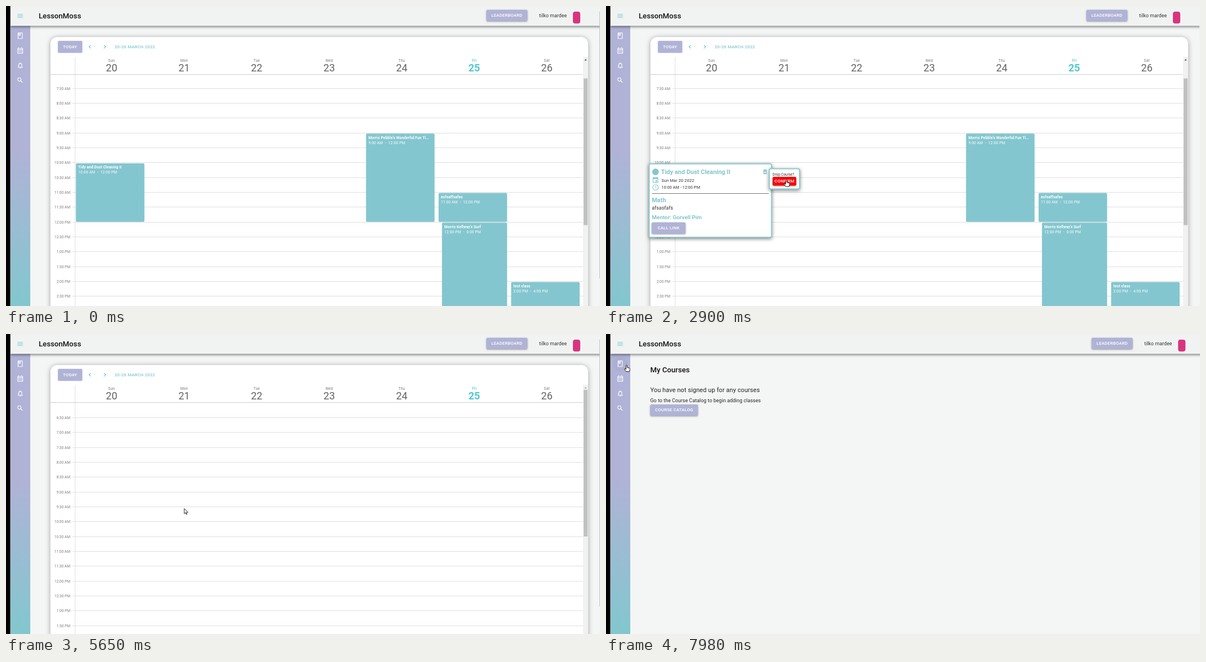
Write an HTML page with a canvas that moves like this. It is 1053 px wide and 532 px high and loops after 8 s.

```html
<!DOCTYPE html>
<html lang="en">
<head>
<meta charset="utf-8">
<title>Class calendar</title>
<style>
html, body { margin: 0; width: 100%; height: 100%; overflow: hidden; background: #f4f5f5; }
canvas { display: block; }
</style>
</head>
<body>
<canvas id="stage" width="1053" height="532"></canvas>
<script>
const c = document.getElementById('stage').getContext('2d');
const LOOP = 8000, W = 1053, H = 532;
const TEAL = '#84c6cf', LILAC = '#b0b3d6', LINE = '#e0e0e0';
const HOUR = 52.65;

const icons = {
  menu: 'M3 18h18v-2H3v2zm0-5h18v-2H3v2zm0-7v2h18V6H3z',
  book: 'M18 2H6c-1.1 0-2 .9-2 2v16c0 1.1.9 2 2 2h12c1.1 0 2-.9 2-2V4c0-1.1-.9-2-2-2zM9 4h2v5l-1-.75L9 9V4zm9 16H6V4h1v9l3-2.25L13 13V4h5v16z',
  month: 'M19 4h-1V2h-2v2H8V2H6v2H5c-1.1 0-2 .9-2 2v14c0 1.1.9 2 2 2h14c1.1 0 2-.9 2-2V6c0-1.1-.9-2-2-2zm0 16H5V10h14v10zm0-12H5V6h14v2zM9 14H7v-2h2v2zm4 0h-2v-2h2v2zm4 0h-2v-2h2v2zm-8 4H7v-2h2v2zm4 0h-2v-2h2v2zm4 0h-2v-2h2v2z',
  bell: 'M12 22c1.1 0 2-.9 2-2h-4c0 1.1.9 2 2 2zm6-6v-5c0-3.07-1.63-5.64-4.5-6.32V4c0-.83-.67-1.5-1.5-1.5s-1.5.67-1.5 1.5v.68C7.64 5.36 6 7.92 6 11v5l-2 2v1h16v-1l-2-2zm-2 1H8v-6c0-2.48 1.51-4.5 4-4.5s4 2.02 4 4.5v6z',
  search: 'M15.5 14h-.79l-.28-.27C15.41 12.59 16 11.11 16 9.5 16 5.91 13.09 3 9.5 3S3 5.91 3 9.5 5.91 16 9.5 16c1.61 0 3.09-.59 4.23-1.57l.27.28v.79l5 4.99L20.49 19l-4.99-5zm-6 0C7.01 14 5 11.99 5 9.5S7.01 5 9.5 5 14 7.01 14 9.5 11.99 14 9.5 14z',
  trash: 'M6 19c0 1.1.9 2 2 2h8c1.1 0 2-.9 2-2V7H6v12zm2.46-7.12l1.41-1.41L12 12.59l2.12-2.12 1.41 1.41L13.41 14l2.12 2.12-1.41 1.41L12 15.41l-2.12 2.12-1.41-1.41L10.59 14l-2.13-2.12zM15.5 4l-1-1h-5l-1 1H5v2h14V4z',
  event: 'M17 12h-5v5h5v-5zM16 1v2H8V1H6v2H5c-1.1 0-2 .9-2 2v14c0 1.1.9 2 2 2h14c1.1 0 2-.9 2-2V5c0-1.1-.9-2-2-2h-1V1h-2zm3 18H5V8h14v11z',
  clock: 'M12 2a10 10 0 1 0 0 20a10 10 0 1 0 0-20zM12 20a8 8 0 1 1 0-16a8 8 0 1 1 0 16zm.5-13H11v6l5.25 3.15.75-1.23-4.5-2.67z',
  prev: 'M15.41 7.41L14 6l-6 6 6 6 1.41-1.41L10.83 12z',
  next: 'M10 6L8.59 7.41 13.17 12l-4.58 4.59L10 18l6-6z'
};
for (const k in icons) icons[k] = new Path2D(icons[k]);
const arrow = new Path2D('M0 0V9.2L2.1 7.3 3.5 10.4 5 9.8 3.7 6.7H6.5Z');
const hand = new Path2D('M-1 1C-1-.2 1-.2 1 1V4.4L5 5.4Q6 5.8 6 7.3L5 11.6H-.8L-3.6 7.8Q-4 6.2-2.6 6.4L-1 7.8Z');

// day column, start hour, end hour, indent, title, start label, end label
const events = [
  [0, 10, 12, 0, 'Tidy and Dust Cleaning II', '10:00 AM', '12:00 PM'],
  [4, 9, 12, 0, "Morris Pebble's Wonderful Fun Ti…", '9:00 AM', '12:00 PM'],
  [5, 11, 12, 0, 'asfsaffsafas', '11:00 AM', '12:00 PM'],
  [5, 12, 15, 6, "Morris Kellway's Surf", '12:00 PM', '3:00 PM'],
  [6, 14, 16, 0, 'test class', '2:00 PM', '4:00 PM']
];

// pointer path: time, x, y
const path = [
  [230, 430, 545], [650, 254, 327], [960, 199, 320], [1050, 198, 320], [1260, 198.5, 326],
  [1460, 198.5, 326], [1900, 281, 291], [2450, 281, 291], [2880, 319.5, 308.5],
  [4900, 319.5, 308.5], [4910, 316, 309.5], [6080, 316, 309.5], [6230, 77, 332],
  [6520, 100, 428], [6880, 148, 380], [7250, 62, 82], [7470, 62, 82], [7640, 36.5, 55]
];

const ease = (t, from, dur) => {
  const p = Math.min(1, Math.max(0, (t - from) / dur));
  return p * p * (3 - 2 * p);
};

function pointer(t) {
  const i = path.findIndex(k => k[0] > t);
  if (i === 0) return path[0].slice(1);
  if (i < 0) return path[path.length - 1].slice(1);
  const [t0, x0, y0] = path[i - 1], [t1, x1, y1] = path[i];
  const p = ease(t, t0, t1 - t0);
  return [x0 + (x1 - x0) * p, y0 + (y1 - y0) * p];
}

function rect(x, y, w, h, color) {
  c.fillStyle = color;
  c.fillRect(x, y, w, h);
}

function box(x, y, w, h, r, color, blur = 0, drop = 0, shade = 'rgba(0,0,0,.4)') {
  c.save();
  if (blur) { c.shadowColor = shade; c.shadowBlur = blur; c.shadowOffsetY = drop; }
  c.fillStyle = color;
  c.beginPath();
  c.roundRect(x, y, w, h, r);
  c.fill();
  c.restore();
}

// y is the middle of the capital letters
function text(s, x, y, size, color, weight = 400, align = 'left', space = 0, family = 'Roboto') {
  c.font = `${weight} ${size}px ${family}, sans-serif`;
  c.letterSpacing = space * size + 'px';
  c.textAlign = align;
  c.fillStyle = color;
  c.fillText(s, x, y + size * .355);
}

function icon(name, x, y, size, color) {
  c.save();
  c.translate(x - size / 2, y - size / 2);
  c.scale(size / 24, size / 24);
  c.fillStyle = color;
  c.fill(icons[name]);
  c.restore();
}

function button(s, x, y, w, h, color = LILAC, raised = true) {
  box(x, y, w, h, 2, color, raised ? 3 : 0, 1);
  text(s, x + w / 2, y + h / 2 - (raised ? .4 : 0), 7.68, '#fff', 500, 'center', .0286);
}

function frame(shift, hoverBook) {
  const fade = c.createLinearGradient(0, 36, 0, H);
  fade.addColorStop(0, LILAC);
  fade.addColorStop(.45, LILAC);
  fade.addColorStop(1, '#82c7ce');
  rect(8, 30, 35, H, fade);
  if (hoverBook) box(12, 39.6, 26.4, 26.4, 13.2, 'rgba(0,0,0,.02)');
  ['book', 'month', 'bell', 'search'].forEach((n, i) => icon(n, 25.2, 52.8 + i * 26.3, 13.2, '#fff'));
  box(8, -10, W, 45.3, 0, '#f1f3f3', 5, 1.5, 'rgba(0,0,0,.6)');
  icon('menu', 25.2, 17.5, 13.2, '#78c9d3');
  text('LessonMoss', 58, 17.5, 13.16, '#111', 500);
  button('LEADERBOARD', 851.7 + shift, 6.7, 72.5, 19.8);
  text('tilko mardee', 945 + shift, 17.3, 8.77, '#333', 400, 'left', .0094);
  box(1005 + shift, 10, 13, 21, 4, '#d9357f');
}

function appointment([day, from, to, indent, title, start, end], left, col, nine) {
  const x = left + day * col + 1 + indent, y = nine + (from - 9) * HOUR + 1.3;
  box(x, y, 121.5 - indent, (to - from) * HOUR - 1.4, 2, TEAL);
  text(title, x + 4.2, y + 7.2, 6.58, '#fff', 700, 'left', .02);
  text(start, x + 4.2, y + 16, 6.58, '#fff', 400, 'left', .0333);
  const dash = x + 4.2 + c.measureText(start).width + 4;
  text('-', dash, y + 16, 6.58, '#fff');
  text(end, dash + 5.5, y + 16, 6.58, '#fff', 400, 'left', .0333);
}

function calendar({ x, right, wide, scrolled, shown, point }) {
  const left = x + 44.2, end = right - 9, nine = scrolled ? 225 : 280;
  const head = wide ? x : left, col = (end - head) / 7;
  box(x, 55, right - x, 600, 12, '#fff', 9, 1, 'rgba(0,0,0,.35)');

  c.save();
  c.beginPath();
  c.rect(x, 122, right - x, H);
  c.clip();
  if (point && point[0] > left && point[0] < end && point[1] > 122) {
    const i = Math.floor((point[0] - left) / col);
    const j = Math.floor((point[1] - nine) / HOUR * 2);
    rect(left + i * col, nine + j * HOUR / 2, col, HOUR / 2, '#eff7fd');
  }
  for (let h = 6.5; h < 15.5; h += .5) {
    const y = nine + (h - 9) * HOUR, hour = Math.floor(h);
    if (y < 125) continue;
    rect(left - 5, Math.round(y - .4), end - left + 5, 1, LINE);
    const label = `${hour > 12 ? hour - 12 : hour}:${h % 1 ? '30' : '00'} ${h < 12 ? 'AM' : 'PM'}`;
    text(label, x + 35.2, y + .4, 6.58, '#7d7d7d', 400, 'right');
  }
  rect(Math.floor(left), 122, 1, H, LINE);
  shown.forEach(e => appointment(e, left, col, nine));
  c.restore();

  button('TODAY', x + 13.2, 61.8, 43.5, 21.4, LILAC, false);
  icon('prev', x + 70, 72.3, 13.2, '#62bfca');
  icon('next', x + 96.5, 72.3, 13.2, '#62bfca');
  text('20-26 MARCH 2022', x + 113.8, 72.3, 7.68, TEAL, 500, 'left', .0286);
  if (!wide) rect(Math.floor(left), 90, 1, 32, LINE);
  'Sun Mon Tue Wed Thu Fri Sat'.split(' ').forEach((d, i) => {
    const mid = head + (i + .5) * col, today = i === 5;
    text(d, mid, 96.3, 6.58, today ? '#4fc9d2' : '#777', today ? 500 : 400, 'center', .0333);
    text(20 + i, mid, 109.3, 18, today ? '#4fc9d2' : '#626262', today ? 700 : 400, 'center');
  });
  rect(x, 121, end - x, 1, '#cfcfcf');

  rect(end, 90, 9, H, '#f1f1f1');
  rect(end + 1, scrolled ? 128.5 : 99, 7, 260, '#c1c1c1');
  c.fillStyle = scrolled ? '#404040' : '#a3a3a3';
  c.beginPath();
  c.moveTo(end + 2.4, 96.5);
  c.lineTo(end + 4.5, 94);
  c.lineTo(end + 6.6, 96.5);
  c.fill();
}

// grows to full size first, then finishes fading in
function panel(x, y, w, h, alpha, grow, content) {
  if (alpha <= 0) return;
  c.save();
  c.globalAlpha = alpha;
  c.translate(x, y);
  c.scale(.75 + .25 * grow, .56 + .44 * grow);
  c.translate(-x, -y);
  box(x, y, w, h, 3, '#fff', 6, 2, 'rgba(0,0,0,.5)');
  c.strokeStyle = TEAL;
  c.lineWidth = 1.7;
  c.beginPath();
  c.roundRect(x + .85, y + .85, w - 1.7, h - 1.7, 2.5);
  c.stroke();
  content();
  c.restore();
}

function details() {
  box(82, 288.3, 11.6, 11.6, 5.8, TEAL);
  text('Tidy and Dust Cleaning II', 97.6, 294.6, 10.97, TEAL, 700);
  icon('trash', 282, 294, 11.5, TEAL);
  icon('event', 87.8, 308.8, 13, TEAL);
  text('Sun Mar 20 2022', 98.3, 309, 7.5, '#333', 400, 'left', .0107);
  icon('clock', 87.8, 321.6, 13, TEAL);
  text('10:00 AM - 12:00 PM', 98.3, 321.6, 7.4, '#333');
  rect(81.5, 332, 207, 1, '#777');
  text('Math', 81.2, 343.8, 10.97, TEAL, 700);
  text('afsasfafs', 81.2, 358, 8.77, '#333', 400, 'left', .0094);
  text('Mentor: Gorvell Pim', 81.2, 374.3, 9.87, TEAL, 700);
  button('CALL LINK', 81, 383.8, 60, 20);
}

function confirmDrop() {
  text('Drop Course?', 295.2, 298.3, 6.4, '#333');
  button('CONFIRM', 295.4, 303, 41.8, 15.6, '#f9060a');
}

function courses() {
  text('My Courses', 78.5, 63.7, 13.16, '#111', 500);
  text('You have not signed up for any courses', 78.5, 99, 10.97, '#222', 400, 'left', .0075);
  text('Go to the Course Catalog to begin adding classes', 78.5, 118, 8.77, '#222', 400, 'left', .0094);
  button('COURSE CATALOG', 78.5, 125, 84.4, 20);
}

function cursor(t, [x, y]) {
  const over = t > 900 && t < 1260 && x < 245 || t > 1850 && t < 4900 || t > 7600;
  const shape = over ? hand : arrow;
  c.save();
  c.translate(x, y);
  c.lineJoin = 'round';
  c.lineWidth = .9;
  c.fillStyle = '#fff';
  c.strokeStyle = '#111';
  c.fill(shape);
  c.stroke(shape);
  c.restore();
}

function draw(t) {
  const reload = 5270, ready = 5600, fetched = 5850, leave = 7760;
  const point = pointer(t), loading = t >= reload && t < ready;
  const popup = t >= 1260 && t < reload, onCourses = t >= leave;
  rect(0, 0, W, H, '#f4f5f5');

  if (onCourses) courses();
  else {
    const hover = t > 230 && t < 1000 && point[0] >= 245 || t > 6230 && point[0] < 251;
    calendar({
      x: loading ? 7.8 : 78.7,
      right: loading ? 1030.4 : 1032,
      wide: loading,
      scrolled: t < reload,
      shown: t < reload ? events : t < fetched ? [] : events.slice(1),
      point: hover ? point : null
    });
  }
  if (!loading) frame(onCourses ? 9.2 : 0, t > 7620);
  if (!onCourses) {
    rect(1052, 0, 1, H, '#f1f1f1');
    if (!popup) rect(1052, 10, 1, 473, '#c1c1c1');
  }
  rect(0, 0, 7.6, H, '#000');

  if (popup) {
    panel(75.8, 279, 218.4, 132, ease(t, 1260, 250), ease(t, 1260, 190), details);
    const closing = 1 - ease(t, 3480, 240);
    panel(288.8, 287.8, 55.2, 37.4, ease(t, 2160, 250) * closing, ease(t, 2160, 190) * closing, confirmDrop);
  }
  if (t >= 4500 && t < ready) {
    box(7.6, 520, 350, 13, [0, 2, 0, 0], '#202124');
    text('Waiting for localhost...', 10.5, 526.3, 6, '#e8eaed', 400, 'left', 0, '"Open Sans"');
  }
  if (t >= 230) cursor(t, point);
}

function tick(now) {
  draw(now % LOOP);
  requestAnimationFrame(tick);
}
requestAnimationFrame(tick);
</script>
</body>
</html>
```
